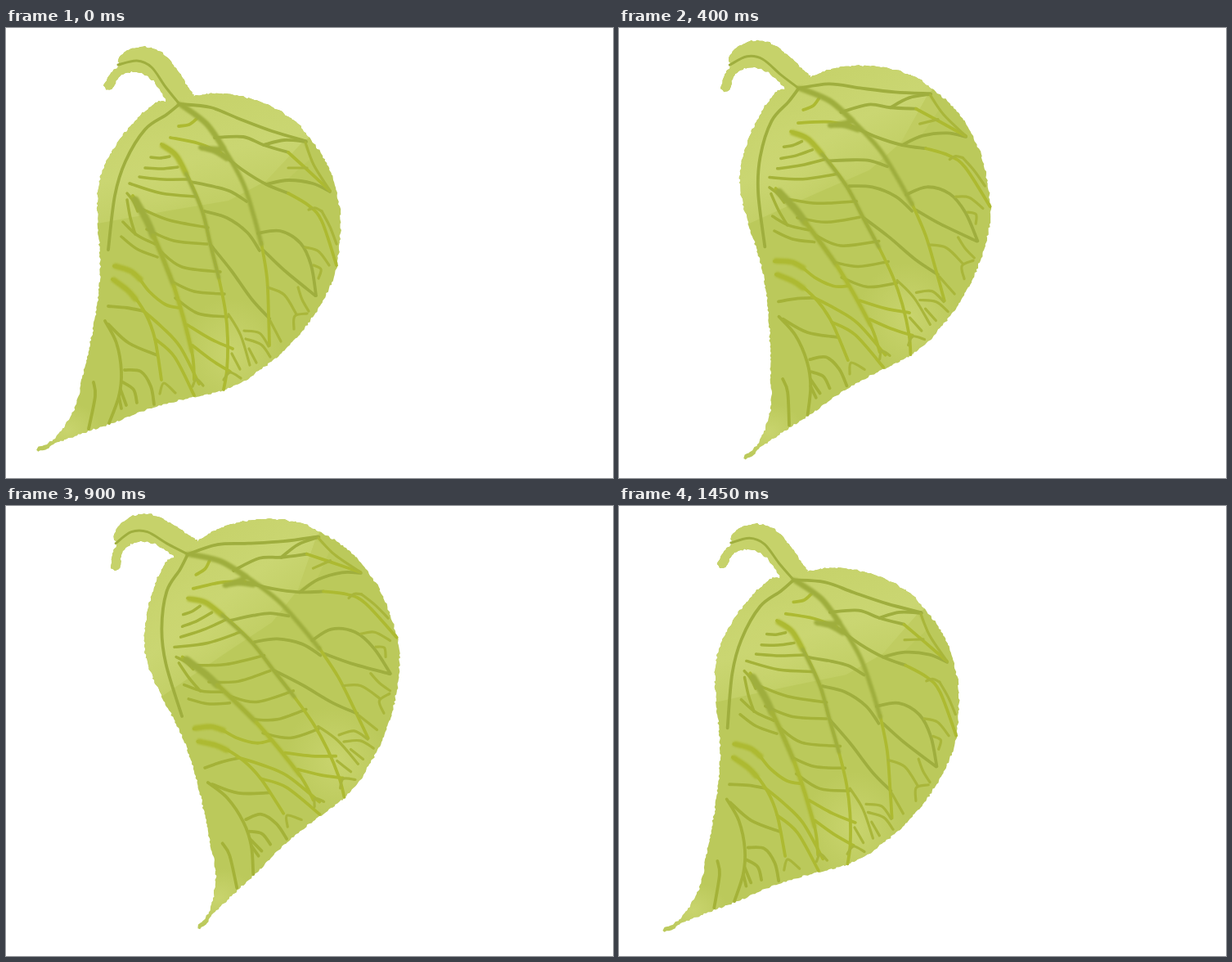
These frames come from a looping animation (742 by 550 pixels, 1.5 s). An HTML page:

```html
<!DOCTYPE html>
<html lang="en">
<head>
<meta charset="utf-8">
<title>Swinging leaf</title>
<style>
  html, body { margin: 0; width: 100%; height: 100%; overflow: hidden; background: #fff; }
  svg { display: block; width: 742px; height: 550px; }
  .vein path { fill: none; stroke-linecap: round; stroke-linejoin: round; }
</style>
</head>
<body>
<svg viewBox="0 0 742 550">
  <defs>
    <clipPath id="clip"><path id="clipEdge"/></clipPath>
    <linearGradient id="sheen" gradientUnits="userSpaceOnUse" x1="200" y1="85" x2="235" y2="225">
      <stop offset="0" stop-color="#c6d26a"/>
      <stop offset=".55" stop-color="#cad672"/>
      <stop offset="1" stop-color="#c1ce64"/>
    </linearGradient>
    <radialGradient id="glow">
      <stop offset="0" stop-color="#cbd671" stop-opacity=".85"/>
      <stop offset="1" stop-color="#cbd671" stop-opacity="0"/>
    </radialGradient>
    <filter id="soft" x="-20%" y="-20%" width="140%" height="140%"><feGaussianBlur stdDeviation="1.3"/></filter>
  </defs>
  <g id="leaf">
    <path id="body" fill="#bbc95b"/>
    <g clip-path="url(#clip)">
      <path d="M90 243L200 223L272 211L318 187L362 140L376 130V0H90Z" fill="url(#sheen)"/>
      <path d="M318 187L362 140L372 160L345 184Z" fill="#c3cf66" opacity=".6"/>
      <ellipse cx="180" cy="172" rx="62" ry="58" fill="url(#glow)"/>
      <ellipse cx="275" cy="398" rx="62" ry="68" fill="url(#glow)"/>
      <ellipse cx="75" cy="492" rx="42" ry="34" fill="url(#glow)"/>
    </g>
    <g class="vein" id="veins"></g>
    <g class="vein" id="thick" filter="url(#soft)"></g>
  </g>
</svg>
<script>
const STEP = 50, LOOP = 1500, PEAK = 800, SWING = 28;
const PIVOT = "137 52";
const OLIVE = "#9fae3e", LIME = "#adba31", MOSS = "#a4b238";
const $ = id => document.getElementById(id);

// Smooth curve through "x,y x,y ..." points
function curve(text) {
  const p = text.trim().split(/\s+/).map(s => s.split(",").map(Number));
  let d = `M${p[0]}`;
  for (let i = 0; i < p.length - 1; i++) {
    const a = p[i - 1] || p[i], b = p[i], c = p[i + 1], e = p[i + 2] || c;
    d += `C${b.map((v, k) => v + (c[k] - a[k]) / 6)} ${c.map((v, k) => v - (e[k] - b[k]) / 6)} ${c}`;
  }
  return d;
}

function stroke(parent, color, width, lines) {
  for (const line of lines) {
    const path = document.createElementNS("http://www.w3.org/2000/svg", "path");
    path.setAttribute("d", curve(line));
    path.setAttribute("stroke", color);
    path.setAttribute("stroke-width", width);
    $(parent).append(path);
  }
}

// Roughen an outline with small seeded offsets
function roughen(path) {
  let seed = 7;
  const jitter = () => ((seed = seed * 16807 % 2147483647) / 2147483647 - .5) * 2;
  const points = [];
  for (let s = 0, end = path.getTotalLength(); s < end; s += 2.5) {
    const q = path.getPointAtLength(s);
    points.push([(q.x + jitter()).toFixed(1), (q.y + jitter()).toFixed(1)]);
  }
  return "M" + points.join("L") + "Z";
}

const right = "230,83 265,80 310,90 345,108 370,132 395,172 407,215 409,245 404,292 390,328 365,367 330,403 290,432 262,444 225,452 180,464 130,483 100,493 62,507 ";
const left = "54,511 48,515 39,517 39,513 50,508 58,503 71,487 85,462 95,420 105,375 112,335 115,300 114,265 112,230 113,195 122,165 140,135 165,106 185,90 195,89 ";
const stem = "188,75 178,63 165,55 150,54 138,59 133,70 128,76 121,74 121,66 128,55 138,46 137,40 144,30 155,25 170,23 190,30 205,45 218,65 230,83";

$("body").setAttribute("d", curve(right + left + stem));
const edge = roughen($("body"));
$("body").setAttribute("d", edge);
$("clipEdge").setAttribute("d", edge);

// Upper veins
stroke("veins", OLIVE, 3.8, [
  "212,93 196,106 170,124 146,163 133,205 125,271",
  "212,93 250,97 285,111 325,126 366,138",
  "255,134 290,133 315,143 345,152",
  "315,143 340,137 367,139",
  "262,152 290,174 318,191 345,202",
  "318,191 345,186 375,190 396,200",
  "226,188 255,194 275,200 294,212",
  "243,224 270,232 295,250 310,272",
  "308,251 335,248 360,263 373,290 379,327",
  "250,265 275,296 300,331 322,355",
  "315,272 340,296 378,327"
]);
stroke("veins", OLIVE, 3, ["137,45 160,40 178,48 195,72 212,93"]);

// Ribs on the left half
stroke("veins", MOSS, 3.5, [
  "177,158 188,159 200,157",
  "170,171 190,172 210,170",
  "163,182 192,185 222,185",
  "151,190 190,202 233,206",
  "168,222 200,235 247,244",
  "172,246 205,260 246,264",
  "143,237 160,253 182,264",
  "141,255 160,270 185,280",
  "188,272 215,292 262,298",
  "203,310 230,322 267,325",
  "207,330 235,349 271,353",
  "148,202 156,212 161,224",
  "148,210 152,232 158,252"
]);

// Lower left
stroke("veins", MOSS, 3.8, [
  "125,340 148,342 168,346",
  "121,358 135,385 141,420 138,450 126,483",
  "125,362 150,385 185,400",
  "107,433 109,450 101,490",
  "145,418 165,420 177,438 181,460",
  "143,433 156,442 160,458",
  "140,442 147,461",
  "138,450 141,465"
]);

// Yellow-green veins
stroke("veins", LIME, 3.8, [
  "190,142 208,155 225,187 240,224 250,265 260,305 268,345 271,380 270,418 266,442",
  "155,205 172,235 188,272 205,315 217,355 228,400 230,430",
  "132,291 156,299 175,322 195,338 212,342",
  "130,307 152,323 171,350 182,380 190,430",
  "166,344 190,365 213,390 236,435",
  "182,380 206,402 230,449",
  "201,134 235,141 262,152",
  "211,120 224,118 233,111",
  "312,262 319,305 321,350 322,388",
  "345,202 370,217 386,236 404,290",
  "345,152 368,173 396,199",
  "222,363 250,380 277,392",
  "228,388 250,405 274,420"
]);

// Small forks along the rim
stroke("veins", "#a9b63a", 3.2, [
  "366,140 376,167 396,199",
  "345,171 368,171",
  "370,222 378,220 386,224",
  "386,224 396,243 404,264",
  "366,268 382,273 395,290",
  "376,290 385,295 382,306",
  "320,317 340,326 355,350",
  "352,368 353,352 368,349",
  "357,317 362,332 370,346",
  "272,350 287,376 298,412",
  "291,370 310,373 321,389",
  "293,380 312,387 323,402",
  "297,392 306,409",
  "276,398 286,417",
  "323,358 336,383",
  "188,447 193,434 207,446",
  "228,438 233,429 241,437",
  "266,430 274,421 287,428"
]);

// Brushy, heavier strokes
stroke("thick", OLIVE, 5.5, ["212,93 245,117 268,150 290,190 303,230 312,264"]);
stroke("thick", OLIVE, 7, ["216,95 245,117 266,147"]);
stroke("thick", OLIVE, 6, ["238,146 255,151 270,160", "240,147 264,148"]);
stroke("thick", LIME, 7, ["192,144 208,156 220,178", "134,291 152,297 164,307", "132,308 148,320 158,331"]);
stroke("thick", OLIVE, 4.5, ["220,178 240,224 250,265 260,305"]);
stroke("thick", OLIVE, 9, ["158,210 172,235 180,254"]);
stroke("thick", MOSS, 6, ["180,254 190,277 205,315"]);
stroke("thick", LIME, 5, ["205,315 217,355 227,395"]);

function draw(now) {
  const t = Math.floor(now % LOOP / STEP) * STEP;
  const angle = SWING * (t < PEAK ? t / PEAK : (LOOP - t) / (LOOP - PEAK));
  $("leaf").setAttribute("transform", `rotate(${-angle} ${PIVOT})`);
  requestAnimationFrame(() => draw(performance.now() - start));
}
const start = performance.now();
draw(0);
</script>
</body>
</html>
```
